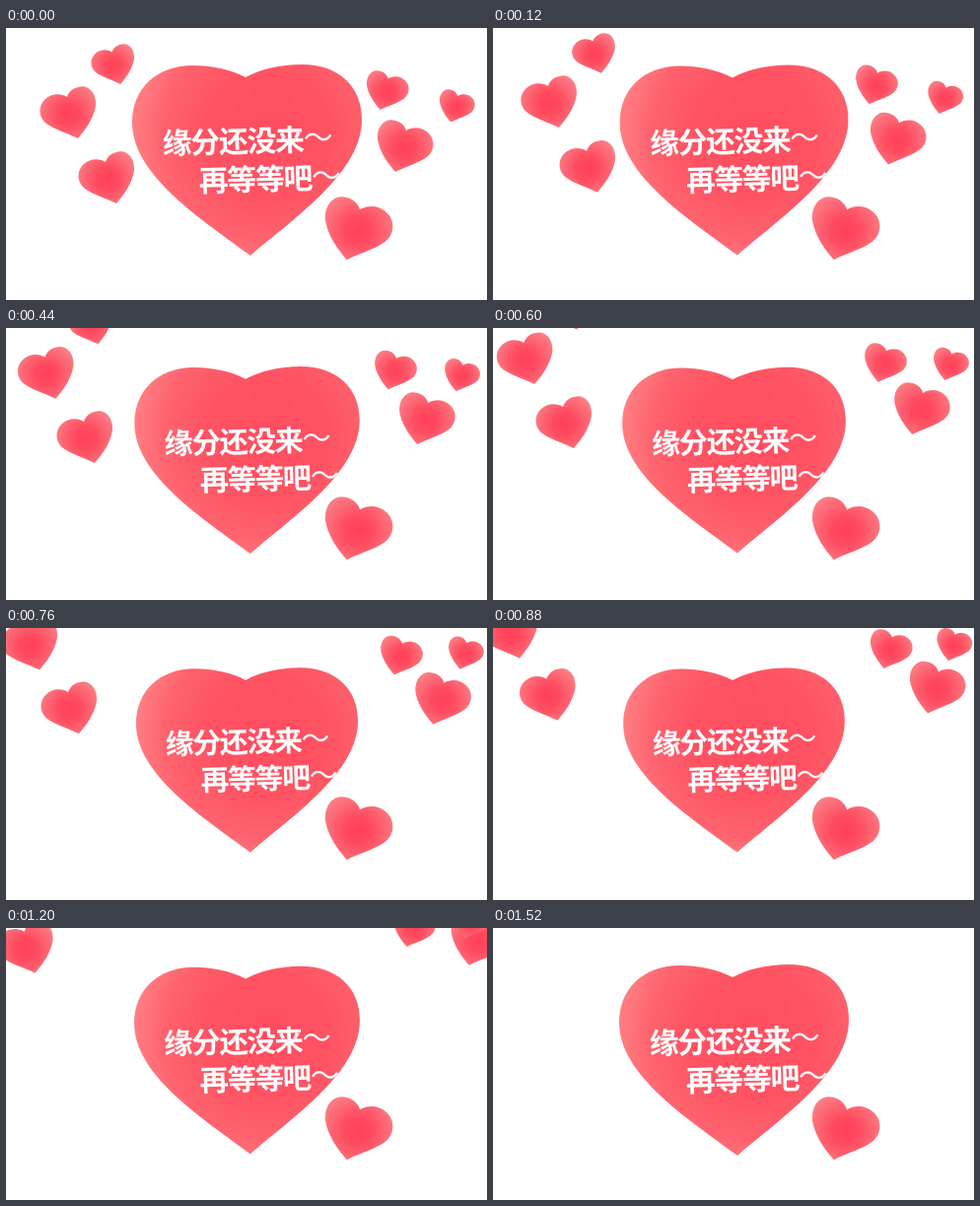
An HTML page that plays this animation: 488 px wide and 276 px high, repeating every 1.6 s.

```html
<!DOCTYPE html>
<html lang="zh">
<head>
<meta charset="utf-8">
<title>Hearts</title>
<style>
html, body { margin: 0; width: 100%; height: 100%; overflow: hidden; background: #fff; }
svg { display: block; width: 100%; height: 100%; }
text { font: 700 30px "Noto Sans CJK SC", "Noto Sans CJK", sans-serif; letter-spacing: -1.4px; fill: #fff; }
tspan { font-weight: 400; }
</style>
</head>
<body>
<svg viewBox="0 0 488 276" lang="zh-CN">
  <defs>
    <radialGradient id="bigFill" gradientUnits="userSpaceOnUse" cx="266" cy="108" r="144">
      <stop offset="0" stop-color="#ff4d5f"/>
      <stop offset=".45" stop-color="#ff5363"/>
      <stop offset=".75" stop-color="#fe636e"/>
      <stop offset="1" stop-color="#ff8487"/>
    </radialGradient>
    <radialGradient id="smallFill" gradientUnits="userSpaceOnUse" cx="29.5" cy="28.5" r="32">
      <stop offset="0" stop-color="#ff4058"/>
      <stop offset=".35" stop-color="#ff4a5f"/>
      <stop offset="1" stop-color="#fb7d84"/>
    </radialGradient>
    <path id="heart" fill="url(#smallFill)" d="M28 11C22 7 12 7 6 13C-2 20 -1 32 7 38C15 44 27 47 39 53C46 45 55 33 57 20C58 8 51 0 43 .3C35 1 30 5 28 11Z"/>
  </defs>
  <g id="big">
    <path fill="url(#bigFill)" d="M243 50C228 42 208 38 190 38C152 38 128 62 128 96C128 150 200 195 248 231C293 192 362 146 361 92C361 60 338 37 300 37C278 37 258 42 243 50Z"/>
    <text x="159" y="128" transform="rotate(-1.5 159 128)">缘分还没来<tspan dy="-2">～</tspan></text>
    <text x="196" y="166" transform="rotate(-1.5 196 166)">再等等吧<tspan dy="-2">～</tspan></text>
  </g>
  <g id="small"></g>
</svg>
<script>
const STEP = 40, LOOP = 1600, LAST = 38, TURN = 21;
const CX = 244.5, CY = 134.5, SHRINK = 0.038;
const big = document.getElementById("big");
const layer = document.getElementById("small");

// Left edge, top, width, mirrored, velocity before and after TURN (px per step)
const hearts = [
  { x: 86, y: 16, w: 44, v1: [-2.07, -3.69], v2: [-2.07, -3.69] },
  { x: 34, y: 59, w: 57, v1: [-2.05, -3.66], v2: [-3, -4.5] },
  { x: 73, y: 125, w: 57, v1: [-2, -3.73], v2: [-4.5, -6] },
  { x: 366, y: 43, w: 43, flip: true, v1: [0.75, -1.87], v2: [1.25, -2.75] },
  { x: 377, y: 93, w: 57, flip: true, v1: [2.02, -2.54], v2: [3.6, -6.1] },
  { x: 440, y: 62, w: 36, flip: true, v1: [0.48, -2.83], v2: [0.48, -2.83] },
  { x: 324, y: 171, w: 69, flip: true, v1: [0, 0], v2: [0, 0] }
];

for (const h of hearts) {
  h.el = document.createElementNS("http://www.w3.org/2000/svg", "use");
  h.el.setAttribute("href", "#heart");
  layer.appendChild(h.el);
}

function draw(ms) {
  const k = Math.min(LAST, Math.floor((ms % LOOP) / STEP));
  const a = Math.min(k, TURN), b = k - a;

  const s = 1 - SHRINK * (a / TURN - b / (LAST - TURN));
  big.setAttribute("transform", `translate(${CX} ${CY}) scale(${s}) translate(${-CX} ${-CY})`);

  for (const { el, x, y, w, flip, v1, v2 } of hearts) {
    const px = x + v1[0] * a + v2[0] * b + (flip ? w : 0);
    const py = y + v1[1] * a + v2[1] * b;
    const z = w / 57;
    el.setAttribute("transform", `translate(${px} ${py}) scale(${flip ? -z : z} ${z})`);
  }
}

const start = performance.now();
function tick() {
  draw(performance.now() - start);
  requestAnimationFrame(tick);
}
draw(0);
requestAnimationFrame(tick);
</script>
</body>
</html>
```
